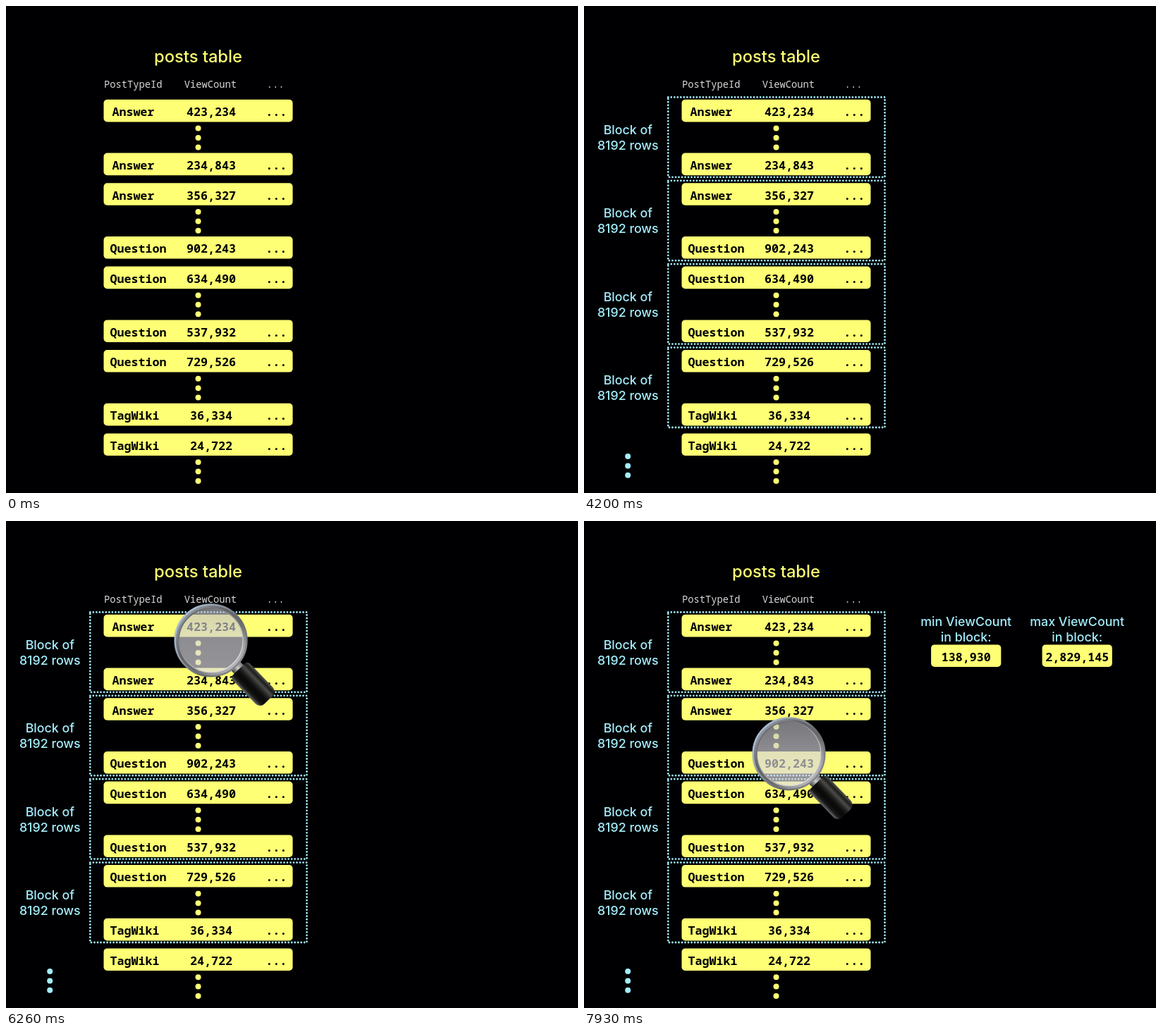
Animation of 811 by 691 pixels, one loop 8000 ms. Source, as an HTML page with a canvas:

```html
<!DOCTYPE html>
<html lang="en">
<head>
<meta charset="utf-8">
<title>Posts table blocks</title>
<style>
  html, body { margin: 0; width: 100%; height: 100%; overflow: hidden; background: #000002; }
  canvas { display: block; }
</style>
</head>
<body>
<canvas id="stage" width="811" height="691"></canvas>
<script>
const W = 811, H = 691, LOOP = 8000, STEP = 1000 / 15;
const YELLOW = '#feff74', CYAN = '#a3edfd', BACK = '#000002';
const SANS = 'Inter, sans-serif', MONO = '"Noto Sans Mono", "DejaVu Sans Mono", monospace';
const PITCH = 118.4;

const ctx = document.getElementById('stage').getContext('2d');
const layer = document.createElement('canvas');
layer.width = W;
layer.height = H;
const lens = layer.getContext('2d');

const ROWS = [
  ['Answer', '423,234'], ['Answer', '234,843'],
  ['Answer', '356,327'], ['Question', '902,243'],
  ['Question', '634,490'], ['Question', '537,932'],
  ['Question', '729,526'], ['TagWiki', '36,334'],
  ['TagWiki', '24,722']
];

const clamp = x => Math.min(1, Math.max(0, x));

function easeInOut(x) {
  const p = 2.5, k = 2 ** (p - 1);
  x = clamp(x);
  return x < 0.5 ? k * x ** p : 1 - k * (1 - x) ** p;
}

function text(str, x, y, font, color, align = 'center') {
  ctx.font = font;
  ctx.fillStyle = color;
  ctx.textAlign = align;
  ctx.fillText(str, x, y);
}

function pill(x, y, w) {
  ctx.fillStyle = YELLOW;
  ctx.beginPath();
  ctx.roundRect(x, y, w, 31.6, 5);
  ctx.fill();
}

function dots(x, y, color) {
  ctx.fillStyle = color;
  for (let i = 0; i < 3; i++) {
    ctx.beginPath();
    ctx.arc(x, y + i * 13.4, 4, 0, Math.PI * 2);
    ctx.fill();
  }
}

const BOLD = '700 16.67px ' + MONO;
const LABEL = '500 17.8px ' + SANS;

function drawTable() {
  const head = '400 13.75px ' + MONO;
  text('posts table', 272.5, 80, '500 23.7px ' + SANS, YELLOW);
  text('PostTypeId', 139, 116, head, '#d8d8d8', 'left');
  text('ViewCount', 252.8, 116, head, '#d8d8d8', 'left');
  text('...', 382, 116, head, '#d8d8d8');

  ROWS.forEach(([type, count], i) => {
    const y = 132.8 + (i >> 1) * PITCH + (i % 2) * 75.8;
    pill(138.5, y, 268);
    text(type, type === 'Answer' ? 150.4 : 147.6, y + 23.4, BOLD, BACK, 'left');
    text(count, 291, y + 23.4, BOLD, BACK);
    text('...', 383.3, y + 23.4, BOLD, BACK);
  });
  for (let i = 0; i < 5; i++) dots(272.5, 173.6 + i * PITCH, YELLOW);
}

function drawBlock(i) {
  const y = i * PITCH;
  ctx.strokeStyle = CYAN;
  ctx.lineWidth = 2.8;
  ctx.lineCap = 'round';
  ctx.setLineDash([0.01, 4.5]);
  ctx.strokeRect(119.3, 129.4 + y, 307.2, 113.4);
  text('Block of', 62.3, 182 + y, LABEL, CYAN);
  text('8192 rows', 62.3, 203.8 + y, LABEL, CYAN);
}

function drawStat(kind, value, x) {
  text(kind + ' ViewCount', x, 149.2, LABEL, CYAN);
  text('in block:', x, 170.8, LABEL, CYAN);
  pill(x - 49.6, 175.4, 99.2);
  text(value, x, 198.6, BOLD, BACK);
}

function gradient(x0, y0, x1, y1, ...colors) {
  const g = lens.createLinearGradient(x0, y0, x1, y1);
  colors.forEach((c, i) => g.addColorStop(i / (colors.length - 1), c));
  return g;
}

function ring(r, width, style) {
  lens.beginPath();
  lens.arc(0, 0, r, 0, Math.PI * 2);
  lens.lineWidth = width;
  lens.strokeStyle = style;
  lens.stroke();
}

// Drawn around the middle of the glass.
function drawGlass() {
  lens.save();
  lens.rotate(46 * Math.PI / 180);
  lens.fillStyle = gradient(0, -9, 0, 9, '#77777a', '#c9c9cb', '#3a3a3c');
  lens.fillRect(49, -9, 12, 18);
  lens.fillStyle = gradient(0, -17, 0, 17,
    '#55554f', '#1d1d1c', '#4b4b48', '#232322', '#0c0c0c', '#0a0a0a', '#1a1a1a', '#6c6c6c');
  lens.beginPath();
  lens.roundRect(57, -17, 60.5, 34, [5, 9, 9, 5]);
  lens.fill();
  lens.restore();

  lens.fillStyle = gradient(0, -46, 0, 46,
    'rgba(188,187,194,.64)', 'rgba(212,211,218,.67)', 'rgba(222,221,226,.67)');
  lens.beginPath();
  lens.arc(0, 0, 46, 0, Math.PI * 2);
  lens.fill();
  ring(47.8, 5, gradient(-34, -34, 34, 34, '#8d9096', '#606267', '#6c6d70', '#b4b4b6'));
  ring(50.8, 2.6, gradient(-40, -25, 40, 30, '#a9bcd2', '#8a9099', '#65666a', '#85868a'));
  ring(45.4, 1.4, gradient(-30, -35, 30, 35, '#5e6064', '#a5a5a8', '#dededf'));
}

function drawMagnifier(t) {
  const u = clamp((t - 4866.7) / 533.3);
  if (u <= 0) return;
  const e = (1 - u) ** 3.2, scale = 1 + 4.85 * e;
  const down = 113.5 * easeInOut((t - 5720) / 1067) + 118 * easeInOut((t - 7133) / 1067);
  lens.clearRect(0, 0, W, H);
  lens.save();
  lens.translate(311 - 26 * e * e, 129.7 + 120 * e * e + down);
  lens.scale(scale, scale);
  lens.translate(-20.5, -20.5);
  drawGlass();
  lens.restore();
  ctx.globalAlpha = u;
  ctx.drawImage(layer, 0, 0);
  ctx.globalAlpha = 1;
}

function draw(now) {
  const t = now % LOOP;
  const tick = Math.floor((t + 7) / STEP) * STEP;
  ctx.fillStyle = BACK;
  ctx.fillRect(0, 0, W, H);
  drawTable();
  for (let i = 0; i < 4; i++) if (t >= 1000 + i * 800) drawBlock(i);
  if (t >= 4200) dots(62.2, 639, CYAN);
  if (t >= 6660) {
    drawStat('min', '138,930', 541.7);
    drawStat('max', '2,829,145', 699.2);
  }
  drawMagnifier(tick);
}

const start = performance.now();
function loop() {
  draw(performance.now() - start);
  requestAnimationFrame(loop);
}
loop();
</script>
</body>
</html>
```
